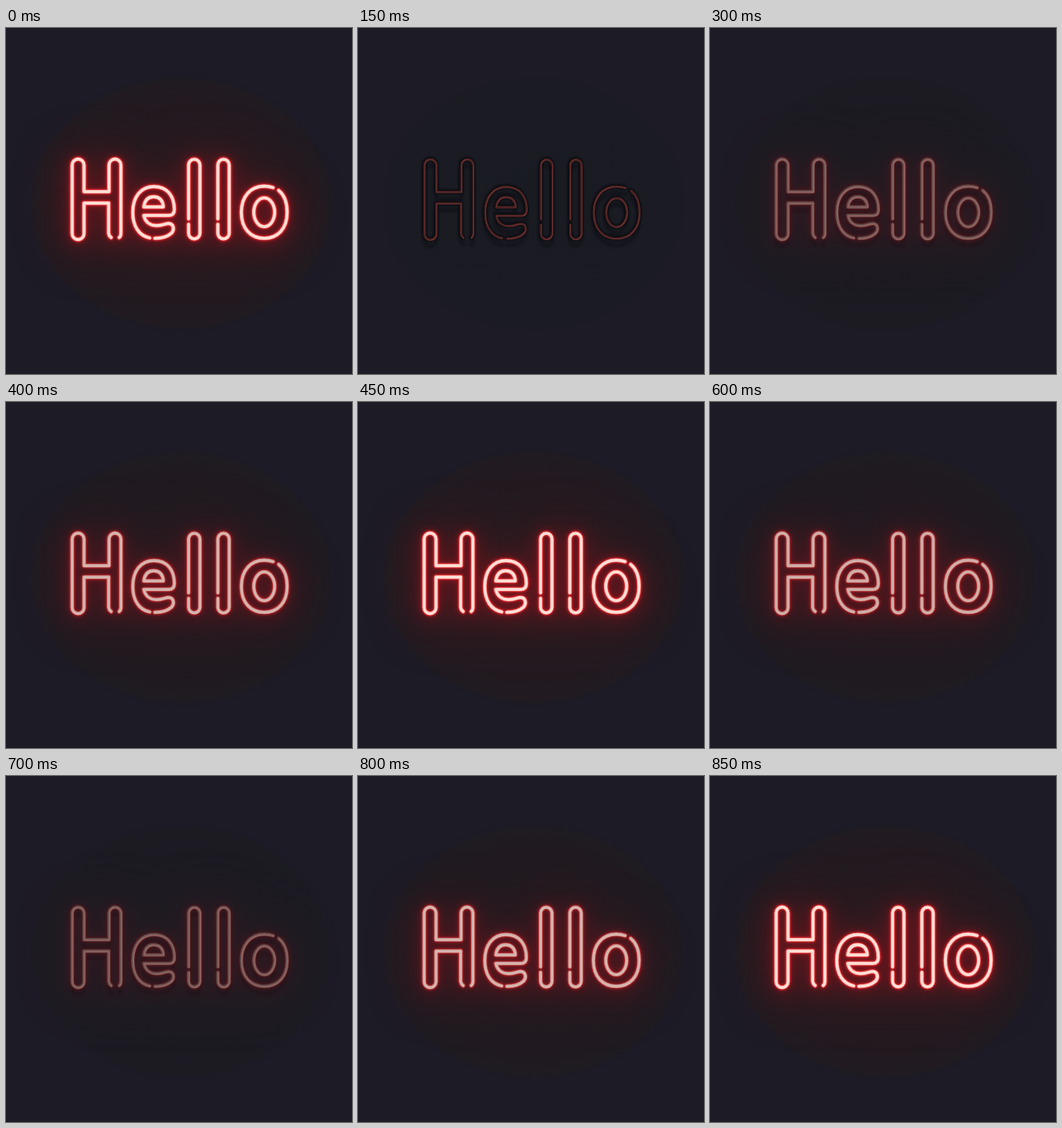
An HTML page for the animation above (900 ms loop, 408x408 px).

```html
<!DOCTYPE html>
<html lang="en">
<head>
<meta charset="utf-8">
<title>Neon Hello</title>
<style>
  html, body { margin: 0; width: 100%; height: 100%; overflow: hidden; background: #1d1b26; }
  svg { display: block; width: 100vw; height: 100vh; }
  .tube { fill: none; stroke-linecap: round; stroke-linejoin: round; }
  filter { color-interpolation-filters: sRGB; }
</style>
</head>
<body>
<svg viewBox="0 0 408 408" role="img" aria-label="Hello">
  <defs>
    <g id="word">
      <!-- H -->
      <path d="M121 206.500H92V242.500A7 7 0 0 1 78 242.500V161.500A7 7 0 0 1 92 161.500V193H121.500V161.500A7 7 0 0 1 135.500 161.500V242Q135.500 245.500 133.500 247"/>
      <path d="M121 206.500V242Q121.500 245.500 124 247"/>
      <!-- e -->
      <path d="M169.500 247.500C157 245 149.500 234 149.500 217.500C149.500 199 159 187 174.500 187C190 187 198.500 198 198.500 214Q198.500 221 192 221H162.500C164 228.500 169.500 233 177.500 233C185 233 187.500 230.500 191.500 230.500C198 230.500 199 238 195 242C190 246.500 183 248 175.500 248"/>
      <path d="M162.500 211C163.500 203.500 167.500 199 174 199C181 199 185 203.500 185.500 211Z"/>
      <!-- l l -->
      <path id="ell" d="M215.300 231.500V242A6.700 6.700 0 0 0 228.700 242V161.500A6.700 6.700 0 0 0 215.300 161.500V225"/>
      <use href="#ell" x="34.500"/>
      <!-- o -->
      <path d="M321.500 191.500C328.500 197 331.500 206.500 331.500 217.500C331.500 236.500 320.500 248 304.500 248C288.500 248 277.500 236.500 277.500 217.500C277.500 198.500 288.500 186.500 304.500 186.500Q310.500 186.500 315 188.200"/>
      <ellipse cx="304.500" cy="217.300" rx="12.300" ry="17"/>
    </g>
    <radialGradient id="halo">
      <stop offset="0" stop-color="#241a1f"/>
      <stop offset=".8" stop-color="#221a20"/>
      <stop offset=".95" stop-color="#201b21"/>
      <stop offset="1" stop-color="#1d1b26" stop-opacity="0"/>
    </radialGradient>
    <radialGradient id="shade">
      <stop offset="0" stop-color="#191b22"/>
      <stop offset=".94" stop-color="#1a1b23"/>
      <stop offset="1" stop-color="#1d1b26" stop-opacity="0"/>
    </radialGradient>
    <filter id="soft" filterUnits="userSpaceOnUse" x="0" y="0" width="408" height="408"><feGaussianBlur stdDeviation="1"/></filter>
    <filter id="near" filterUnits="userSpaceOnUse" x="0" y="0" width="408" height="408"><feGaussianBlur stdDeviation="4"/></filter>
    <filter id="far" filterUnits="userSpaceOnUse" x="0" y="0" width="408" height="408"><feGaussianBlur stdDeviation="13"/></filter>
    <filter id="wide" filterUnits="userSpaceOnUse" x="0" y="0" width="408" height="408"><feGaussianBlur stdDeviation="28"/></filter>
  </defs>

  <rect width="408" height="408" fill="#1d1b26"/>
  <g class="tube">
    <ellipse cx="207" cy="207" rx="182" ry="153" fill="url(#shade)"/>
    <use href="#word" y="8" stroke="#0d0e13" stroke-width="5" opacity=".45" filter="url(#soft)"/>
    <use href="#word" stroke="#0b0a0e" stroke-width="5.500" opacity=".9" filter="url(#soft)"/>
    <use href="#word" x=".4" y=".4" stroke="#6e312f" stroke-width="2.200"/>
    <use href="#word" x="-.2" y="-.2" stroke="#3a1c1d" stroke-width="1"/>
  </g>
  <g class="tube" id="light">
    <ellipse cx="207" cy="207" rx="182" ry="153" fill="url(#halo)"/>
    <use href="#word" y="4" stroke="#44181c" stroke-width="26" opacity=".8" filter="url(#wide)"/>
    <use href="#word" y="3" stroke="#80141d" stroke-width="12" opacity=".5" filter="url(#far)"/>
    <use href="#word" stroke="#a8121e" stroke-width="6" opacity=".6" filter="url(#near)"/>
    <use href="#word" stroke="#e0202a" stroke-width="6" filter="url(#soft)"/>
    <use href="#word" stroke="#ff6a62" stroke-width="4.600"/>
    <use href="#word" stroke="#ffe0d8" stroke-width="3.300"/>
  </g>
</svg>
<script>
  const LOOP = 900;
  // [time in ms, brightness], each held until the next
  const levels = [
    [0, 1], [150, 0], [300, .3], [350, .53], [400, .77], [450, 1],
    [500, .94], [550, .85], [600, .74], [650, .53], [700, .3],
    [750, .53], [800, .77], [850, 1], [LOOP, 1]
  ];
  document.getElementById("light").animate(
    levels.map(([t, opacity]) => ({ offset: t / LOOP, opacity, easing: "steps(1, end)" })),
    { duration: LOOP, iterations: Infinity }
  );
</script>
</body>
</html>
```
